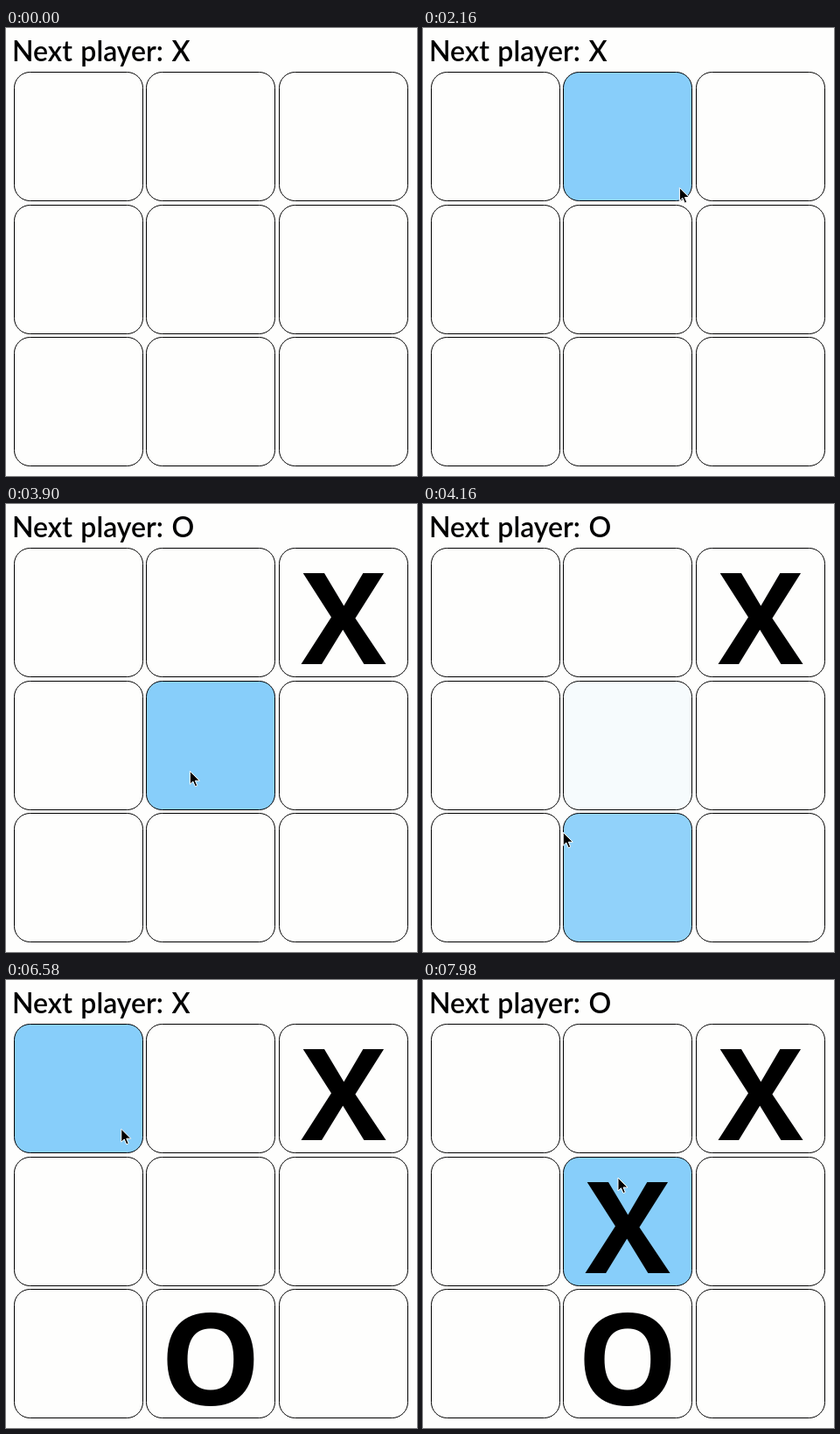
An HTML page that plays this animation: 470 px wide and 512 px high, repeating every 8000 ms.

```html
<!DOCTYPE html>
<html lang="en">
<head>
<meta charset="utf-8">
<title>Tic-tac-toe</title>
<style>
  html, body { margin: 0; width: 100%; height: 100%; overflow: hidden; background: #fefefd; }
  svg { display: block; }
  rect { fill: lightskyblue; stroke: #000; }
  .mark { font: 700 145.5px "Open Sans", "Noto Sans", sans-serif; text-anchor: middle; }
  .status { font: 600 32px Lato, sans-serif; word-spacing: 1.5px; }
</style>
</head>
<body>
<svg width="470" height="512">
  <text class="status" id="status" x="7" y="37.5"></text>
  <g id="board"></g>
  <path id="cursor" d="M0 0V15L3.5 11.8 6 17.6 8.4 16.5 6 11H11Z" stroke="#fff"/>
</svg>
<script>
const LOOP = 8000, FADE = 150, STEP = 2;
const SIZE = 147, PITCH = 151.5;
const FOCUS = 1900; // the board ignores the pointer before this
const clicks = [2880, 5120, 7740];

// [time, x, y] of the pointer tip; it slows down into every stop
const stops = [
  [220, 417, 1], [420, 353, 112], [FOCUS, 353, 112], [2160, 293, 182],
  [2400, 340, 250], [2800, 386, 142], [3540, 386, 142], [3700, 330, 250],
  [3980, 200, 310], [4160, 160, 375], [4640, 235, 440], [5020, 235, 440],
  [5712, 172, 380], [5826, 115, 205], [6300, 115, 230], [6580, 132, 170],
  [7000, 85, 215], [7200, 100, 400], [7460, 120, 280], [7660, 240, 262],
  [7980, 223, 226]
];

const $ = id => document.getElementById(id);
const easeOut = v => 1 - (1 - v) ** 2;

function pointer(t) {
  const next = stops.findIndex(s => s[0] > t);
  if (next < 1) return stops.at(next).slice(1);
  const [t0, x0, y0] = stops[next - 1], [t1, x1, y1] = stops[next];
  const part = easeOut((t - t0) / (t1 - t0));
  return [x0 + (x1 - x0) * part, y0 + (y1 - y0) * part];
}

function add(name, attributes) {
  const node = document.createElementNS("http://www.w3.org/2000/svg", name);
  for (const key in attributes) node.setAttribute(key, attributes[key]);
  return $("board").appendChild(node);
}

const cells = Array.from({ length: 9 }, (_, i) => {
  const x = Math.floor(9 + PITCH * (i % 3)) + 0.5;
  const y = Math.floor(50.6 + PITCH * Math.floor(i / 3)) + 0.5;
  return {
    x, y,
    box: add("rect", { x, y, width: SIZE, height: SIZE, rx: 18 }),
    mark: add("text", { class: "mark", x: x + SIZE / 2, y: y + 132.5 })
  };
});

function cellAt(t) {
  const [px, py] = pointer(t);
  const within = (p, from) => p >= from - 1 && p <= from + SIZE + 1;
  return t < FOCUS ? -1 : cells.findIndex(c => within(px, c.x) && within(py, c.y));
}

// Each cell's strength is its recent hover time, the newest weighing most
function hoverLevels(t) {
  const levels = Array(9).fill(0);
  for (let age = STEP / 2; age < FADE; age += STEP) {
    const i = cellAt(t - age);
    if (i >= 0) levels[i] += 2 * (1 - age / FADE) * STEP / FADE;
  }
  return levels;
}

const moves = clicks.map(cellAt);

function draw(now) {
  const t = now % LOOP;
  const played = clicks.filter(time => t >= time).length;
  const levels = hoverLevels(t);
  $("status").textContent = "Next player: " + "XO"[played % 2];
  cells.forEach(({ box, mark }, i) => {
    box.setAttribute("fill-opacity", levels[i]);
    const turn = moves.indexOf(i);
    mark.textContent = turn >= 0 && turn < played ? "XO"[turn % 2] : "";
  });
  $("cursor").setAttribute("transform", `translate(${pointer(t)})`);
  $("cursor").setAttribute("visibility", t < stops[0][0] ? "hidden" : "visible");
}

const start = performance.now();
(function tick() {
  draw(performance.now() - start);
  requestAnimationFrame(tick);
})();
</script>
</body>
</html>
```
